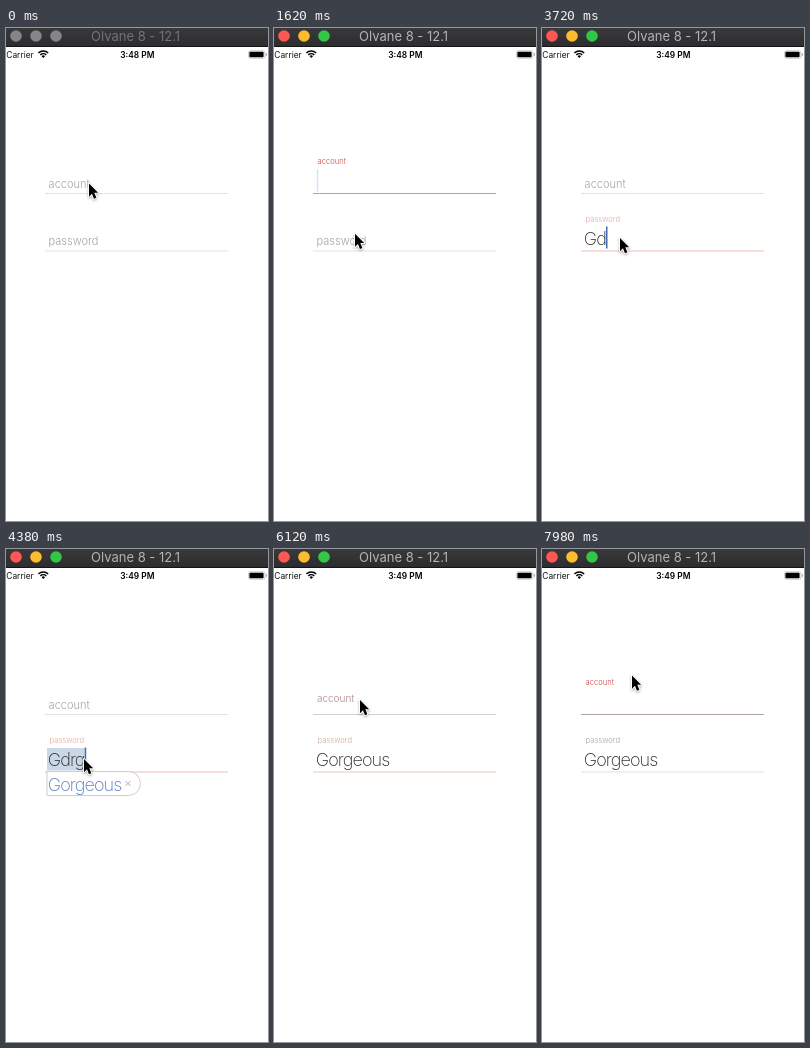
An HTML page with a canvas for the animation above (8000 ms loop, 262 by 493 pixels).

```html
<!DOCTYPE html>
<html lang="en">
<head>
<meta charset="utf-8">
<title>Floating labels</title>
<style>
  html, body { margin: 0; width: 100%; height: 100%; overflow: hidden; background: #fff; }
  canvas { display: block; width: 262px; height: 493px; }
</style>
</head>
<body>
<canvas id="stage"></canvas>
<script>
const W = 262, H = 493, LOOP = 8000;
const canvas = document.getElementById('stage');
const ctx = canvas.getContext('2d');
const dpr = window.devicePixelRatio || 1;
canvas.width = W * dpr;
canvas.height = H * dpr;

const FAMILY = 'Inter, Roboto, sans-serif';
const GREY = [164, 164, 164];
const CARET = '#4468b8';
const INK = '#2b2b2b';

const clamp = v => Math.min(1, Math.max(0, v));
const mix = (a, b, p) => a + (b - a) * p;
const ramp = (t, from, to) => {
  const p = clamp((t - from) / (to - from));
  return p * p * (3 - 2 * p);
};
const blend = (a, b, p) => `rgb(${a.map((v, i) => Math.round(mix(v, b[i], p))).join(',')})`;

function setFont(size, weight, track) {
  ctx.font = `${weight} ${size}px ${FAMILY}`;
  ctx.letterSpacing = track + 'px';
}

function text(str, x, y, size, color, { weight = 400, align = 'left', track = 0 } = {}) {
  setFont(size, weight, track);
  ctx.textAlign = align;
  ctx.fillStyle = color;
  ctx.fillText(str, x, y);
}

function rect(x, y, w, h, color) {
  ctx.fillStyle = color;
  ctx.fillRect(x, y, w, h);
}

function disc(x, y, r, color) {
  ctx.fillStyle = color;
  ctx.beginPath();
  ctx.arc(x, y, r, 0, Math.PI * 2);
  ctx.fill();
}

function titleBar(active) {
  const shade = ctx.createLinearGradient(0, 0, 0, 18);
  shade.addColorStop(0, '#39393b');
  shade.addColorStop(1, '#2d2d2f');
  rect(0, 0, W, 18, shade);
  rect(0, 18, W, 1, '#151516');
  const lights = active ? ['#fc5753', '#fdbc2e', '#33c748'] : ['#858587', '#858587', '#858587'];
  lights.forEach((c, i) => disc(10 + i * 20, 8, 5.8, c));
  text('Olvane 8 - 12.1', 129.6, 13, 13, active ? '#b4b4b6' : '#737375', { align: 'center' });
}

function wifi(x, y) {
  const a = -Math.PI * 0.75, b = -Math.PI * 0.25;
  ctx.fillStyle = ctx.strokeStyle = '#000';
  ctx.beginPath();
  ctx.moveTo(x, y);
  ctx.arc(x, y, 2.4, a, b);
  ctx.fill();
  ctx.lineWidth = 1.5;
  for (const r of [4.2, 6.9]) {
    ctx.beginPath();
    ctx.arc(x, y, r, a, b);
    ctx.stroke();
  }
}

function battery() {
  ctx.strokeStyle = '#b4b4b4';
  ctx.lineWidth = 0.7;
  ctx.beginPath();
  ctx.roundRect(242.4, 22.8, 16.6, 7.4, 2);
  ctx.stroke();
  ctx.fillStyle = '#000';
  ctx.beginPath();
  ctx.roundRect(243.4, 23.7, 14.2, 5.6, 1);
  ctx.fill();
  rect(259.8, 25.3, 1, 2.4, '#999');
}

function statusBar(t) {
  text('Carrier', 0.3, 29.6, 8.4, '#111');
  wifi(37.3, 29.9);
  text(t < 3540 ? '3:48 PM' : '3:49 PM', 131.3, 29.6, 8.4, '#000', { weight: 600, align: 'center' });
  battery();
}

// raised: 0 = placeholder, 1 = floating label; focus blends the colours
function field(name, lineY, raised, focus, labelColor, lineColor) {
  text(name, mix(42.6, 43.6, raised), lineY - mix(5.6, 29.4, raised),
    mix(11, 7.6, raised), blend(GREY, labelColor, focus), { weight: 350 });
  rect(39, lineY - 0.5, 183, 1, blend([226, 226, 226], lineColor, focus));
}

// Solid until `start`, then fades out and back every 900 ms
function caret(t, start, x, y) {
  const phase = t < start ? 899 : (t - start) % 900;
  ctx.globalAlpha = 1 - ramp(phase, 0, 180) + ramp(phase, 370, 550);
  rect(x, y, 1.5, 22, CARET);
  ctx.globalAlpha = 1;
}

const BIG = { weight: 200, track: -0.9 };
const BIG_SIZE = 18;

function bigText(str, y, color) {
  text(str, 41.7, y, BIG_SIZE, color, BIG);
}

function bigWidth(str) {
  setFont(BIG_SIZE, BIG.weight, BIG.track);
  return ctx.measureText(str).width;
}

function suggestion(alpha) {
  ctx.globalAlpha = alpha;
  ctx.fillStyle = '#fff';
  ctx.strokeStyle = '#c9ccd2';
  ctx.lineWidth = 1;
  ctx.beginPath();
  ctx.roundRect(41, 222.5, 93.5, 24, [0, 12, 12, 0]);
  ctx.fill();
  ctx.stroke();
  bigText('Gorgeous', 241.6, '#4f76c4');
  ctx.strokeStyle = '#aaa';
  ctx.beginPath();
  ctx.moveTo(119.5, 232);
  ctx.lineTo(124.5, 237);
  ctx.moveTo(124.5, 232);
  ctx.lineTo(119.5, 237);
  ctx.stroke();
  ctx.globalAlpha = 1;
}

const KEYS = [[3240, 'G'], [3420, 'd'], [3960, 'r'], [4140, 'g']];
const ACCEPT = 6000;

function passwordText(t) {
  if (t >= ACCEPT) {
    bigText('Gorgeous', 216.8, INK);
    return;
  }
  const typed = KEYS.filter(k => t >= k[0]).map(k => k[1]).join('');
  const end = typed ? 41.8 + bigWidth(typed) : 42.8;
  const hint = ramp(t, 4200, 4400);
  if (hint > 0) {
    ctx.globalAlpha = hint;
    rect(41, 199, end - 41, 22.5, '#c9d7e6');
    ctx.globalAlpha = 1;
  }
  bigText(typed, 216.8, INK);
  if (t >= 2160) {
    const last = KEYS.reduce((at, k) => t >= k[0] ? k[0] : at, 0);
    caret(t, last ? last + 600 : 2940, end, 198.5);
  }
  if (hint > 0) suggestion(hint);
}

// [start, end, x, y]: each move ends at x, y
const MOVES = [[0, 60, 80, 155], [1200, 1640, 81, 206], [1640, 1740, 78, 210],
  [5580, 5940, 86, 151], [7740, 7980, 90, 126.5]];

function pointer(t) {
  let x = 83, y = 155.5;
  for (const [from, to, tx, ty] of MOVES) {
    const p = ramp(t, from, to);
    x = mix(x, tx, p);
    y = mix(y, ty, p);
  }
  ctx.save();
  ctx.translate(x, y);
  ctx.scale(0.9, 0.9);
  const arrow = new Path2D('M0 0V14.6L3.3 11.5 5.5 17 8.2 15.8 5.9 10.4H10.2Z');
  ctx.shadowColor = 'rgba(0,0,0,.35)';
  ctx.shadowBlur = 2.5 * dpr;
  ctx.shadowOffsetY = dpr;
  ctx.lineWidth = 2;
  ctx.lineJoin = 'round';
  ctx.strokeStyle = '#fff';
  ctx.stroke(arrow);
  ctx.shadowColor = 'transparent';
  ctx.fillStyle = '#000';
  ctx.fill(arrow);
  ctx.restore();
}

function draw(t) {
  ctx.setTransform(dpr, 0, 0, dpr, 0, 0);
  rect(0, 0, W, H, '#fff');
  titleBar(t >= 300);
  statusBar(t);

  const again = ramp(t, 6000, 6340);
  const accountUp = ramp(t, 420, 760) - ramp(t, 2280, 2660) + again;
  const accountFocus = ramp(t, 420, 700) - ramp(t, 2150, 2420) + again;
  const passUp = ramp(t, 2150, 2450);
  field('account', 165.5, accountUp, accountFocus, [208, 72, 66], [178, 164, 166]);
  field('password', 223, passUp, passUp - again, [229, 168, 152], [236, 192, 176]);

  if (t >= 600 && t < 2150) caret(t, 1200, 42.8, 141.5);
  if (t >= 6200) caret(t, 6840, 42.8, 141.5);
  passwordText(t);
  pointer(t);
}

function tick() {
  draw(performance.now() % LOOP);
  requestAnimationFrame(tick);
}
tick();
</script>
</body>
</html>
```
